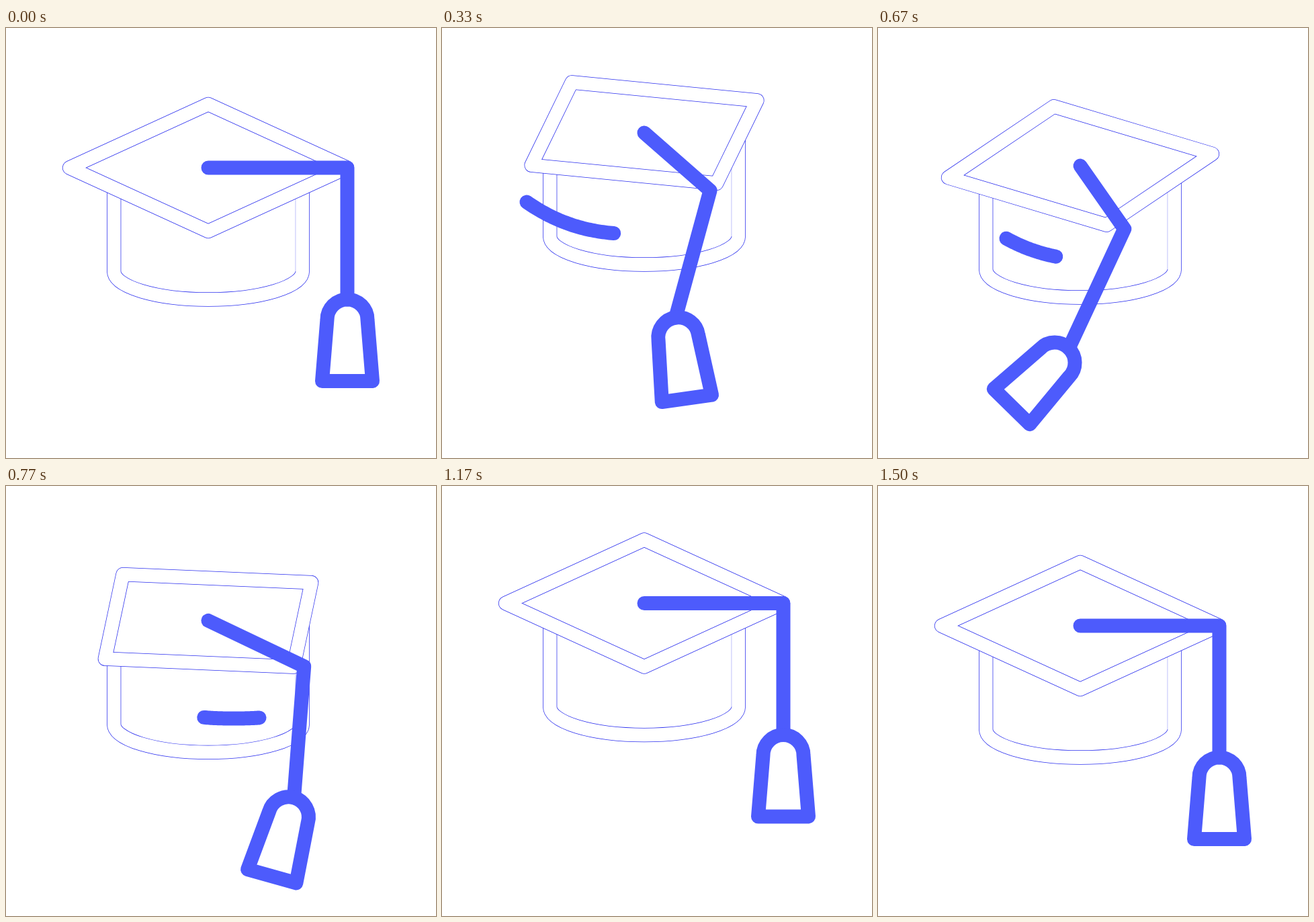
Recreate the animation shown at these times as an HTML page with a canvas. Size 640 by 640 pixels, loop 1.67 s.

```html
<!DOCTYPE html>
<html lang="en">
<head>
<meta charset="utf-8">
<title>Graduation cap</title>
<style>
  html, body { margin: 0; width: 100%; height: 100%; overflow: hidden; background: #fff; }
  canvas { display: block; width: 640px; height: 640px; }
</style>
</head>
<body>
<canvas id="stage" width="640" height="640"></canvas>
<script>
const ctx = document.getElementById('stage').getContext('2d');
const LOOP = 1670, STEP = 1000 / 30, LAST = 45;
const CX = 301, WIDTH = 21;
const BLUE = '#4d5bfc', EDGE = '#2c30ee';
const RAD = Math.PI / 180;

// Times below are in steps of 1/30 s.
function ease(t, from, to) {
  const p = Math.min(1, Math.max(0, (t - from) / (to - from)));
  return (1 - Math.cos(Math.PI * p)) / 2;
}

// Eases through the turning points [time, value] of a swinging part.
function swing(t, ...points) {
  let value = points[0][1];
  for (let i = 1; i < points.length; i++) {
    value += (points[i][1] - points[i - 1][1]) * ease(t, points[i - 1][0], points[i][0]);
  }
  return value;
}

const capY = t => swing(t, [0, 208], [8, 152.5], [20, 205], [32.5, 171], [45, 208]);
const boardAngle = t => swing(t, [0, 0], [17, 90], [30, 0]);
const elbowAngle = t => swing(t, [0, 0], [16, 87], [30, 0]);
const cordAngle = t => swing(t, [0, 0], [5, 4], [16, -40.8], [26, 5], [33, 0]);
const tasselAngle = t => swing(t, [0, 0], [4, 20], [8, 20], [16, -62.4], [29, 21], [33, 0]);

// The board contracts in the middle of each half turn.
const squeeze = t => t < 32 ? Math.sqrt(Math.abs(Math.sin(Math.PI * t / 16))) : 0;

const swipes = [
  { x: 298, y: 259, half: -172, sag: 48, head: [4, 10], tail: [4.5, 14] },
  { x: 339, y: 299, half: 171, sag: 47, head: [15, 29], tail: [18, 30] }
];

function stroke(color, width) {
  ctx.strokeStyle = color;
  ctx.lineWidth = width;
  ctx.stroke();
}

function hairline() {
  stroke(EDGE, WIDTH + 0.3);
  stroke('#fff', WIDTH - 1.2);
}

function drawBand(y) {
  const side = y + 154, rx = 140.3;
  ctx.lineCap = 'butt';
  ctx.beginPath();
  ctx.moveTo(CX - rx, y);
  ctx.lineTo(CX - rx, side);
  ctx.ellipse(CX, side, rx, 42, 0, Math.PI, 0, true);
  ctx.lineTo(CX + rx, y);
  hairline();
  // The inner right edge is fainter than the rest.
  ctx.beginPath();
  ctx.moveTo(CX + 130.3, y);
  ctx.lineTo(CX + 130.3, side);
  stroke('rgba(255,255,255,0.7)', 2);
}

function drawSwipe({ x, y, half, sag, head, tail }, t) {
  const start = ease(t, ...tail), end = ease(t, ...head), pieces = 40;
  if (end <= start) return;
  ctx.beginPath();
  for (let i = 0; i <= pieces; i++) {
    const u = 2 * (start + (end - start) * i / pieces) - 1;
    ctx.lineTo(x + half * u, y + sag * (1 - Math.abs(u) ** 2.5));
  }
  stroke(BLUE, WIDTH);
}

function drawBoard(y, t) {
  const turn = boardAngle(t) * RAD;
  const rx = 206.5 * (1 - 0.035 * squeeze(t)), ry = 94.5 * (1 - 0.057 * squeeze(t));
  ctx.beginPath();
  for (let i = 0; i < 4; i++) {
    const a = turn + i * Math.PI / 2;
    ctx.lineTo(CX + rx * Math.cos(a), y + ry * Math.sin(a));
  }
  ctx.closePath();
  ctx.fillStyle = '#fff';
  ctx.fill();
  hairline();
}

function drawTassel(y, t) {
  const turn = elbowAngle(t) * RAD, cord = cordAngle(t) * RAD;
  const scale = 1 - 0.05 * squeeze(t);
  const ex = CX + 207 * scale * Math.cos(turn), ey = y + 104 * scale * Math.sin(turn);
  const px = ex + 196 * Math.sin(cord), py = ey + 196 * Math.cos(cord);
  ctx.beginPath();
  ctx.moveTo(CX, y);
  ctx.lineTo(ex, ey);
  ctx.lineTo(px, py);
  stroke(BLUE, WIDTH);

  ctx.save();
  ctx.translate(px, py);
  ctx.rotate(-tasselAngle(t) * RAD);
  ctx.beginPath();
  ctx.moveTo(-37.5, 121.5);
  ctx.lineTo(-30, 30);
  ctx.arc(0, 30, 30, Math.PI, 0);
  ctx.lineTo(37.5, 121.5);
  ctx.closePath();
  stroke(BLUE, WIDTH);
  ctx.restore();
}

function draw(now) {
  const t = Math.min(LAST, Math.floor((now % LOOP + 4) / STEP));
  const y = capY(t);
  ctx.fillStyle = '#fff';
  ctx.fillRect(0, 0, 640, 640);
  ctx.lineJoin = 'round';
  drawBand(y);
  drawBoard(y, t);
  ctx.lineCap = 'round';
  swipes.forEach(swipe => drawSwipe(swipe, t));
  drawTassel(y, t);
}

let start;
function tick(now) {
  start ??= now;
  draw(now - start);
  requestAnimationFrame(tick);
}
draw(0);
requestAnimationFrame(tick);
</script>
</body>
</html>
```
